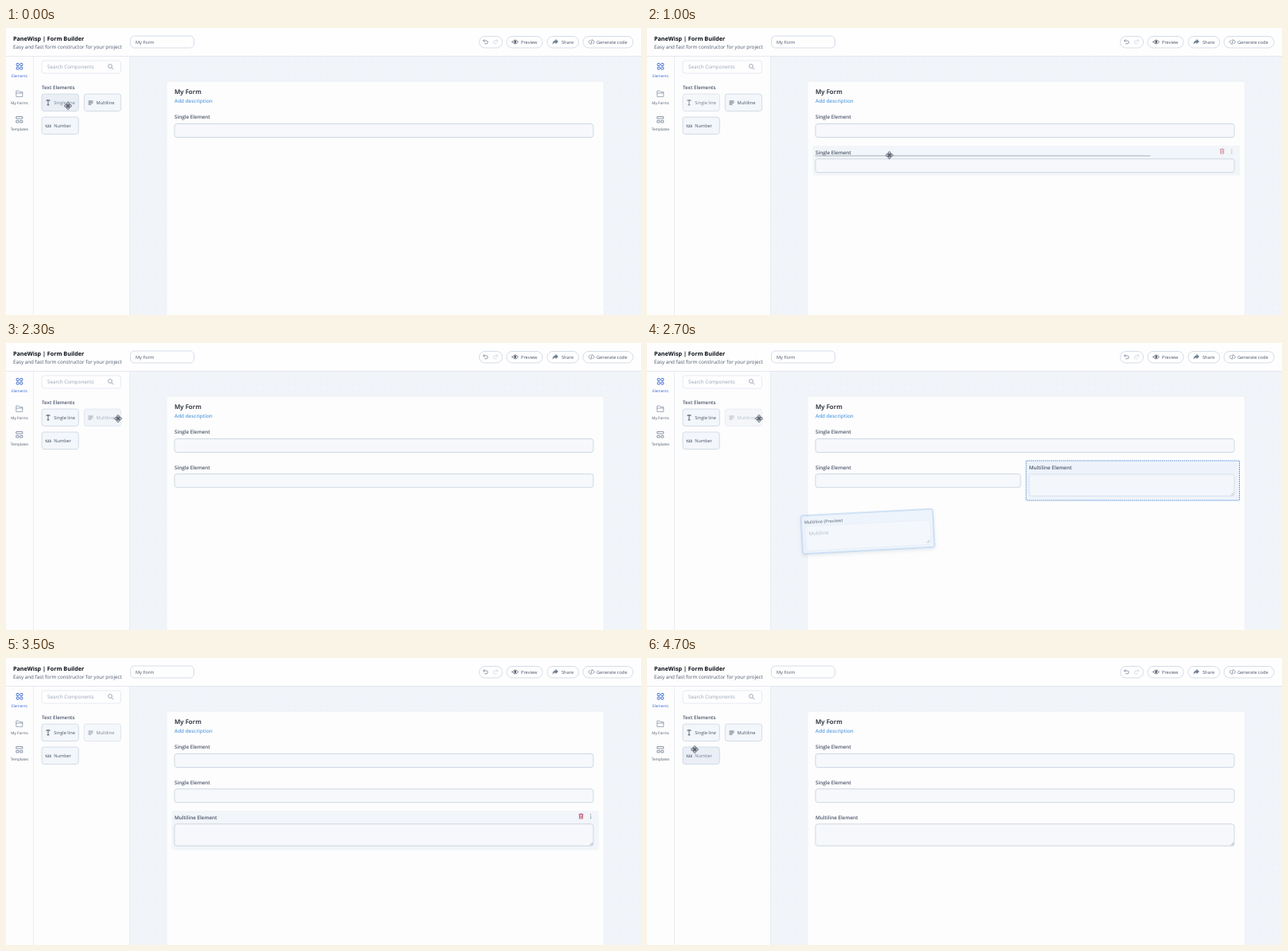
These frames come from a looping animation (799x361 px, 4800 ms). An HTML page:

```html
<!DOCTYPE html>
<html lang="en">
<head>
<meta charset="utf-8">
<title>Form Builder</title>
<style>
  html, body { margin: 0; width: 100%; height: 100%; overflow: hidden; background: #fdfdfe; }
  svg { display: block; width: 100vw; height: 100vh; }
  text { font-family: "Open Sans", "Noto Sans", sans-serif; text-rendering: geometricPrecision; white-space: pre; }
  .line { fill: none; stroke-linecap: round; stroke-linejoin: round; }
</style>
</head>
<body>
<svg id="stage" viewBox="0 0 799 361" xmlns="http://www.w3.org/2000/svg">
  <defs>
    <pattern id="dots" width="8" height="8" patternUnits="userSpaceOnUse">
      <circle cx="4" cy="4" r=".6" fill="#e3e8f0"/>
    </pattern>
    <filter id="soft" x="-10%" y="-30%" width="120%" height="170%">
      <feDropShadow dx="0" dy="2" stdDeviation="2" flood-color="#64748b" flood-opacity=".22"/>
    </filter>
  </defs>
  <g id="base"></g>
  <g id="live"></g>
</svg>
<script>
const LOOP = 4800, STEP = 100;
const INK = '#4a5568', GREY = '#718096', EDGE = '#cbd5e0', BLUE = '#2f62cf';

const rect = (x, y, w, h, r, fill, stroke = 'none', more = '') =>
  `<rect x="${x}" y="${y}" width="${w}" height="${h}" rx="${r}" fill="${fill}" stroke="${stroke}" ${more}/>`;
const text = (x, y, size, fill, str, weight = 400, anchor = 'start') =>
  `<text x="${x}" y="${y}" font-size="${size}" fill="${fill}" font-weight="${weight}" text-anchor="${anchor}">${str}</text>`;
const path = (d, stroke, width = .8, more = '') =>
  `<path class="line" d="${d}" stroke="${stroke}" stroke-width="${width}" ${more}/>`;
const group = (body, attrs) => `<g ${attrs}>${body}</g>`;

// Piecewise linear value over [time, value] pairs
function track(t, keys) {
  if (t <= keys[0][0]) return keys[0][1];
  for (let i = 1; i < keys.length; i++) {
    const [t0, a] = keys[i - 1], [t1, b] = keys[i];
    if (t < t1) return a + (b - a) * (t - t0) / (t1 - t0);
  }
  return keys[keys.length - 1][1];
}

function header() {
  const pill = (x, w) => rect(x, 10.5, w, 14.5, 7, '#fefeff', EDGE, 'stroke-width=".8"');
  const label = (x, str) => text(x, 19.6, 5.65, INK, str);
  return rect(0, 0, 799, 35.5, 0, '#fefeff') + path('M0 35.5H799', '#e4e8ef', 1) +
    text(9, 15.8, 7.2, '#0b0f18', 'PaneWisp | Form Builder', 700) +
    text(9, 25.8, 6.28, INK, 'Easy and fast form constructor for your project') +
    rect(156.5, 10, 80, 15, 5, '#fefeff', EDGE, 'stroke-width=".8"') + label(163, 'My Form') +
    pill(595.5, 29) + pill(630, 45) + pill(681, 39.5) + pill(726, 63) +
    path('M602 14.5L600.5 16L602 17.5M600.7 16H604.3A1.8 1.8 0 0 1 604.3 19.8H602.5', GREY) +
    path('M617.5 14.5L619 16L617.5 17.5M618.8 16H615.2A1.8 1.8 0 0 0 615.2 19.8H617', EDGE) +
    path('M637 17.5Q640.7 12.5 644.4 17.5Q640.7 22.5 637 17.5Z', INK) +
    `<circle cx="640.7" cy="17.5" r="1.4" fill="${INK}"/>` + label(648, 'Preview') +
    `<path d="M691.5 13.8L695 17L691.5 20.2V18.4Q688.8 18.2 687.6 20.8Q687.8 16 691.5 15.6Z" fill="${GREY}"/>` +
    label(699, 'Share') +
    path('M735 15.3L732.9 17.5L735 19.7M738.4 15.3L740.5 17.5L738.4 19.7M737.3 14.5L736.1 20.5', GREY) +
    label(743, 'Generate code');
}

function rail() {
  const tile = (x, y) => rect(x, y, 3, 3, .8, 'none', BLUE, 'stroke-width=".9"');
  const name = (y, str, fill) => text(17, y, 4.7, fill, str, 400, 'middle');
  return rect(0, 36, 155.5, 325, 0, '#fdfdfe') +
    path('M34.5 36V361M155.5 36V361', '#e9edf3', 1) +
    tile(13.2, 44.5) + tile(17.8, 44.5) + tile(13.2, 49.1) + tile(17.8, 49.1) + name(62, 'Elements', BLUE) +
    path('M12.8 86V79H15.8L17 80.5H20.8V86ZM12.8 82H20.8', '#8b97a8') + name(95.6, 'My Forms', INK) +
    path('M13.2 111.5H20.8V114H13.2ZM13.2 116.3H16V119H13.2ZM18.2 116.3H20.8V119H18.2Z', GREY) +
    name(128.7, 'Templates', INK) +
    rect(45, 41, 99.5, 16, 3, '#fefeff', '#e2e8f0', 'stroke-width=".9"') +
    text(52, 51.2, 6.26, '#98a3b3', 'Search Components') +
    '<circle cx="131" cy="48" r="2.4" fill="none" stroke="#94a0b1" stroke-width=".9"/>' +
    path('M132.9 49.9L135 52', '#94a0b1', .9) +
    text(45, 76.6, 6.2, INK, 'Text Elements', 600);
}

function sheet() {
  return rect(156, 36, 643, 325, 0, '#f1f4f9') + rect(156, 36, 643, 325, 0, 'url(#dots)') +
    rect(202, 67, 550.5, 310, 3, '#fdfdfe', '#eaeef4', 'stroke-width=".8"') +
    text(212, 82.6, 7.95, '#141a26', 'My Form', 600) +
    text(212, 94.2, 6.3, '#5a9fe0', 'Add description', 600);
}

const ICONS = {
  'Single line': path('M51 91.5V90.8H55V91.5M53 90.8V96.8M52 96.8H54', INK, .9),
  'Multiline': path('M104 92H109M104 94H109M104 96H107', INK, .9),
  'Number': text(49, 125, 4.6, INK, '123', 700)
};
const BUTTONS = [[45, 83, 'Single line'], [98.3, 83, 'Multiline'], [45, 112, 'Number']];

function button([x, y, name], cursor, opacity) {
  const over = cursor && cursor.x > x && cursor.x < x + 46.5 && cursor.y > y && cursor.y < y + 21.5;
  return group(rect(x, y, 46.3, 21.5, 3, over ? '#eaeff6' : '#f3f6fa', EDGE, 'stroke-width=".8"') + ICONS[name] +
    text(x + 15.2, y + 13, 5.65, over ? GREY : INK, name), `opacity="${opacity}"`);
}

function field(x, right, y, name, tall, fade = 1) {
  const h = tall ? 27.5 : 17, bottom = y + 16.5 + h;
  return text(x, y + 10.4, 6.3, INK, name + ' Element', 600) +
    group(rect(x, y + 16.5, right - x, h, 3, '#f6f8fb', EDGE, 'stroke-width=".9"') +
      (tall ? path(`M${right - 4} ${bottom - 1}l3-3M${right - 2} ${bottom - 1}l1-1`, GREY, .6) : ''), `opacity="${fade}"`);
}

function slot(x, y, name, tall) {
  return rect(x, y, 745.5 - x, tall ? 50 : 38, 1, '#eef3fb', '#3f7fca', 'stroke-width=".9" stroke-dasharray="1.5 1"') +
    field(x + 3.8, 739, y + .5, name, tall, .65);
}

function hover(y, h, opacity) {
  return rect(208.5, y, 537.5, h, 2, '#f2f5f9') +
    group(path(`M721 ${y + 4.8}H726.2M722.6 ${y + 4.6}V${y + 4}H724.6V${y + 4.6}M721.6 ${y + 5}V${y + 10}H725.6V${y + 5}M723 ${y + 6.5}V${y + 8.5}M724.3 ${y + 6.5}V${y + 8.5}`, '#b8455e') +
      path(`M735.8 ${y + 5}v0M735.8 ${y + 7.2}v0M735.8 ${y + 9.4}v0`, INK, 1.1), `opacity="${opacity}"`);
}

function preview(x, y, name, tall) {
  const h = tall ? 48 : 34, top = -h / 2;
  return group(rect(-83, top, 166, h, 1.5, '#eaf2fc', '#8fbcec', 'filter="url(#soft)"') +
    text(-79.2, top + 10.4, 5.45, INK, name + ' (Preview)', 600) +
    rect(-79, top + 13.5, 158, h - 17, 3, '#f1f6fc', '#dfe8f4', 'stroke-width=".7"') +
    text(-74.2, top + 25, 6.2, '#98a5b6', name) +
    (tall ? path('M74 18l3-3M76 18l1-1', GREY, .6) : ''),
    `transform="translate(${x} ${y}) rotate(-3)" opacity=".75"`);
}

function pointer({ x, y }) {
  const d = 'M-3.6 0H3.6M0-3.6V3.6M-2.4-1.2L-3.8 0L-2.4 1.2M2.4-1.2L3.8 0L2.4 1.2M-1.2-2.4L0-3.8L1.2-2.4M-1.2 2.4L0 3.8L1.2 2.4';
  return group(path(d, '#3d4656', 2) + path(d, '#fff', .7) +
    '<circle r="1.1" fill="#3d4656"/>', `transform="translate(${x} ${y})"`);
}

function cursorAt(t) {
  if (t >= 3500 && t < 3900) return null;
  if (t < 1000) return { x: track(t, [[0, 78], [200, 90]]), y: 98 };
  if (t < 3500) return {
    x: track(t, [[1400, 305], [1900, 128], [2200, 134], [2300, 141]]),
    y: track(t, [[1400, 160], [1900, 95]])
  };
  return {
    x: track(t, [[3900, 305], [4400, 242], [4500, 150], [4600, 85], [4700, 60]]),
    y: track(t, [[3900, 198], [4400, 153], [4500, 130], [4600, 116], [4700, 115]])
  };
}

function rows(t) {
  let out = '';
  const first = t < 500 ? track(t, [[200, 739], [300, 620], [400, 505.5]]) : 739;
  const second = t < 3000 ? track(t, [[2400, 739], [2500, 505.5], [2600, 470]]) : 739;
  if (t >= 1000 && t < 1900) out += hover(148, 37.5, track(t, [[1000, .6], [1100, 1], [1400, 1], [1500, .4]]));
  if (t >= 3500 && t < 4000) out += hover(192, 49.5, 1);

  out += field(212, first, 104, 'Single');
  if (first < 739) out += slot(first + 7, 103.5, 'Single');

  if (t >= 500 && t < 1000) out += slot(208.5, 148, 'Single');
  if (t >= 1000) out += field(212, second, 148.2, 'Single');
  if (second < 739) out += slot(second + 7, 148, 'Multiline', true);

  if (t >= 3000 && t < 3500) out += slot(208.5, 192, 'Multiline', true);
  if (t >= 3500) out += field(212, 739, 192.3, 'Multiline', true);
  if (t >= 1000 && t < 1100) out += path('M212 160.8H633', '#9aa3af', .8);
  return out;
}

function drag(t) {
  if (t >= 300 && t < 1000) return preview(
    track(t, [[300, 205], [400, 254.5], [600, 305]]),
    track(t, [[300, 152], [400, 174.7], [600, 192]]), 'Single line');
  if (t >= 2400 && t < 3500) return preview(
    track(t, [[2400, 190], [2500, 225], [2700, 277.7], [2800, 282], [3300, 305]]),
    track(t, [[2400, 160], [2500, 195], [2700, 237], [2800, 240], [3300, 257]]), 'Multiline', true);
  return '';
}

function draw(t) {
  const cursor = cursorAt(t);
  const fades = [
    track(t, [[100, 1], [200, .65], [300, .45], [900, .45], [1000, .75], [1200, 1]]),
    track(t, [[2200, 1], [2300, .6], [2400, .45], [3400, .45], [3500, .7], [3600, 1]]),
    1
  ];
  return BUTTONS.map((b, i) => button(b, cursor, fades[i])).join('') +
    rows(t) + drag(t) + (cursor ? pointer(cursor) : '');
}

document.getElementById('base').innerHTML = sheet() + rail() + header();
const live = document.getElementById('live');
const start = performance.now();
let shown = -1;

function tick() {
  const t = Math.floor((performance.now() - start) % LOOP / STEP) * STEP;
  if (t !== shown) live.innerHTML = draw(shown = t);
  requestAnimationFrame(tick);
}
tick();
</script>
</body>
</html>
```
